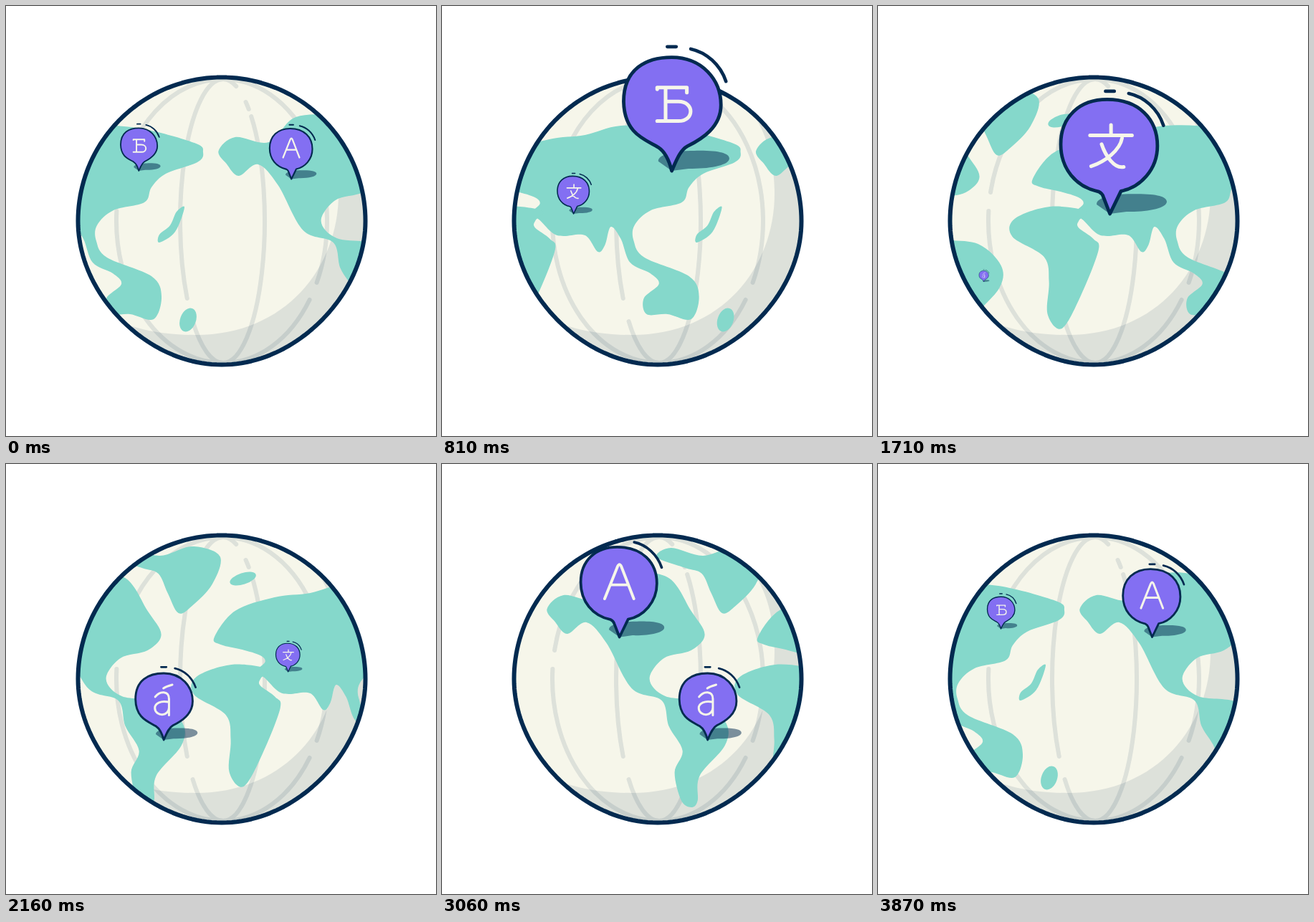
An HTML page for the animation above (3.96 s loop, 600 by 600 pixels).

```html
<!DOCTYPE html>
<html lang="en">
<head>
<meta charset="utf-8">
<title>Languages around the globe</title>
<style>
  html, body { margin: 0; width: 100%; height: 100%; overflow: hidden; background: #fff; }
  svg { display: block; width: 100%; height: 100%; }
  .line { fill: none; stroke: #022a50; stroke-width: 6; stroke-linecap: round; stroke-linejoin: round; }
  .shade { fill: #022a50; opacity: .1; }
  .meridians { opacity: .1; }
  .land { fill: #85d8cb; }
  .body { fill: #836ff2; stroke: #022a50; stroke-width: 6.2; stroke-linejoin: round; }
  .cast { fill: #022a50; opacity: .5; }
  .glyph { fill: none; stroke: #f6f6ea; stroke-width: 6.5; stroke-linecap: round; stroke-linejoin: round; }
</style>
</head>
<body>
<svg viewBox="0 0 600 600">
  <defs><clipPath id="disc"><path id="discPath"/></clipPath></defs>
  <g clip-path="url(#disc)">
    <rect width="600" height="600" fill="#f6f6ea"/>
    <path class="shade" d="M150 436C180 452 222 459 265 459C390 459 464 365 464 262
      C464 215 452 175 432 148H600V600H150Z"/>
    <g class="meridians" id="meridians"></g>
    <g id="world">
      <g class="land" id="land">
        <ellipse cx="254" cy="438" rx="11" ry="17" transform="rotate(20 254 438)"/>
        <ellipse cx="-36" cy="160" rx="19" ry="8" transform="rotate(-18 -36 160)"/>
      </g>
    </g>
  </g>
  <path class="line" id="rim"/>
  <g id="pins"></g>
</svg>
<script>
const STEP = 90, STEPS = 44, SPEED = 15, SKIP = 0.44;
const CYCLE = STEPS + SKIP, WIDTH = CYCLE * SPEED;
const $ = id => document.getElementById(id);

function add(parent, tag, attrs) {
  const el = document.createElementNS('http://www.w3.org/2000/svg', tag);
  for (const key in attrs) el.setAttribute(key, attrs[key]);
  return parent.appendChild(el);
}

// Smooth closed curve through "x,y x,y ..." points
function blob(text) {
  const pts = text.trim().split(/\s+/).map(p => p.split(',').map(Number));
  const at = i => pts[(i + pts.length) % pts.length];
  const parts = pts.map((b, i) => {
    const a = at(i - 1), c = at(i + 1), e = at(i + 2);
    const c1 = b.map((v, k) => v + (c[k] - a[k]) / 6);
    const c2 = c.map((v, k) => v - (e[k] - b[k]) / 6);
    return `C${c1} ${c2} ${c}`;
  });
  return `M${pts[0]}${parts.join('')}Z`;
}

// The globe is a circle, a little flattened at the two lower diagonals
const rim = 'M' + Array.from({ length: 180 }, (_, i) => {
  const a = i * Math.PI / 90;
  const r = 200.5 - (a < Math.PI ? 4 * Math.sin(2 * a) ** 2 : 0);
  return [301 + r * Math.cos(a), 300 + r * Math.sin(a)];
}).join('L') + 'Z';
$('rim').setAttribute('d', rim);
$('discPath').setAttribute('d', rim);

// Half ellipses from pole to pole, drawn between pairs of heights
function meridian(rx, ...heights) {
  const ry = 198;
  const point = y => `${303 + rx * Math.sqrt(1 - ((y - 300) / ry) ** 2)} ${y}`;
  for (let i = 0; i < heights.length; i += 2) {
    const [from, to] = [heights[i], heights[i + 1]];
    const arc = `M${point(from)}A${Math.abs(rx)} ${ry} 0 0 ${rx > 0 ? 1 : 0} ${point(to)}`;
    add($('meridians'), 'path', { class: 'line', d: arc });
  }
}
meridian(-149, 102, 260, 286, 498);
meridian(-60, 102, 408, 440, 498);
meridian(58, 102, 112, 134, 144, 154, 498);
meridian(145, 102, 386, 410, 498);

function land(dx, outline) {
  add($('land'), 'path', { d: blob(outline), transform: `translate(${dx})` });
}
// Asia and Europe
land(-217, `141,242 170,205 225,186 275,180 325,167 400,170 480,191 492,204 484,218 440,234
  420,253 410,274 367,285 344,306 343,328 358,351 420,377 434,405 423,437 390,430 361,430
  357,408 378,388 366,373 338,358 325,325 311,308 303,333 293,343 275,320 245,321 230,317
  212,299 200,289 212,276 205,267 180,259 150,252`);
// Africa
land(-217, `216,286 165,280 116,297 113,322 157,350 164,385 162,430 182,450 208,405 233,341
  226,325 205,309 206,299`);
// The Americas
land(-577, `207,202 230,183 277,190 315,155 375,158 408,205 427,238 408,260 370,271 350,300
  372,324 425,332 457,362 455,393 420,435 417,470 408,479 394,469 385,430 396,400 377,366
  367,330 325,313 290,250 262,221 235,237 218,220`);
// Arctic and the eastern island
land(-472, '255,130 275,117 320,128 365,115 404,129 393,168 365,198 346,208 331,180 318,153 295,145');
land(0, '249,281 236,315 214,330 214,319 229,306 238,287');

for (const side of [-1, 1])
  add($('world'), 'use', { href: '#land', x: side * WIDTH });

// Pin artwork is drawn at full size with its tip at 0,0
const sharp = `M0 0L-12 -31Q-14 -37 -20 -40C-62 -49 -89 -82 -89 -126C-89 -176 -55 -207 -5 -207
  C52 -207 86 -172 86 -123C86 -80 55 -48 20 -41Z`;
const soft = `M0 0C-4 -16 -10 -33 -24 -42C-47 -56 -85 -66 -86 -124C-86 -182 -46 -203 0 -203
  C54 -203 88 -163 88 -118C88 -78 54 -57 28 -44C15 -37 8 -18 0 0Z`;
const cast = 'M-24 -17C-25 -29 2 -36 40 -36C82 -37 103 -32 103 -22C103 -10 68 -3 30 -4L0 0Z';
const marks = 'M-8 -222H8M34 -218C62 -212 87 -190 97 -160';

// x, y: tip when the pin is largest; drift: slide per step before and after that
const pins = [
  { peak: 6.5, x: 275, y: 230, drift: [1.2, 0.5], body: soft,
    glyph: 'M-26 -146V-149H27V-140M-11 -149V-89M-11 -124H12C41 -124 41 -89 12 -89H-26' },
  { peak: 16.44, x: 281.6, y: 290, drift: [1, -1], body: sharp,
    glyph: 'M2 -161V-145M-36 -142H40M22 -137C18 -115 -8 -95 -34 -86M-15 -126C-8 -105 8 -81 25 -85' },
  { peak: 29.44, x: 292.6, y: 385, drift: [0.5, 0.6], body: soft,
    glyph: `M-1 -157Q8 -163 26 -168M-26 -131C-12 -150 16 -150 16 -125V-75
      M16 -115C-8 -121 -27 -112 -27 -97C-27 -83 -14 -77 -5 -77C8 -77 16 -88 16 -98` },
  { peak: 38.44, x: 304, y: 241.5, drift: [0.9, 0.7], body: sharp,
    glyph: 'M-34 -88L-4 -163Q0 -171 4 -163L33 -88M-20 -120H20' }
];
for (const pin of pins) {
  pin.el = add($('pins'), 'g', {});
  for (const [name, d] of Object.entries({ cast, body: pin.body, glyph: pin.glyph, line: marks }))
    add(pin.el, 'path', { class: name, d });
}

// Bell-shaped growth that fades out twelve steps from the peak
function scaleAt(distance) {
  const fade = Math.min(1, Math.max(0, (12 - distance) / 3));
  return fade / (1 + (distance / 4.7) ** 2.7);
}

function draw(ms) {
  const step = Math.floor(ms / STEP) % STEPS;
  const turn = step ? step + SKIP : 0;
  $('world').setAttribute('transform', `translate(${turn * SPEED})`);
  for (const { el, peak, x, y, drift } of pins) {
    let d = turn - peak;
    d -= Math.round(d / CYCLE) * CYCLE;
    const away = Math.abs(d), scale = scaleAt(away);
    const tipX = x + d * SPEED + away * drift[d < 0 ? 0 : 1];
    el.style.display = scale ? '' : 'none';
    el.setAttribute('transform', `translate(${tipX} ${y}) scale(${scale})`);
  }
}

const start = performance.now();
function tick() {
  draw(performance.now() - start);
  requestAnimationFrame(tick);
}
tick();
</script>
</body>
</html>
```
